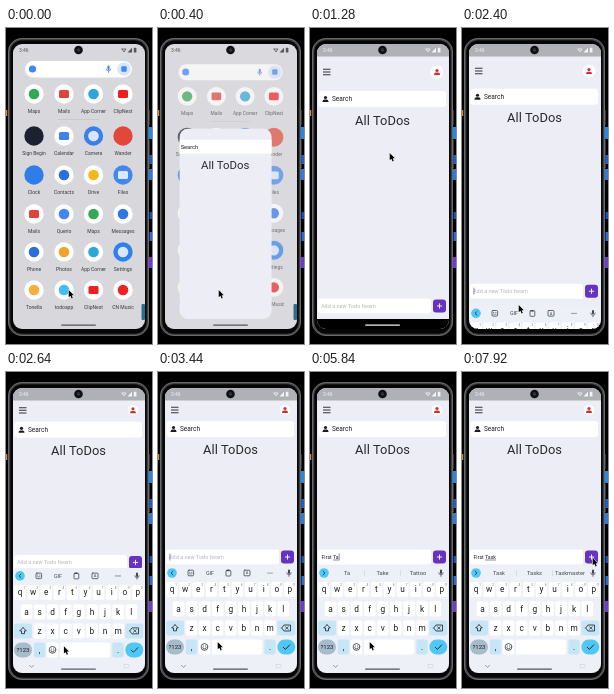
Recreate the animation shown at these times as an HTML page with a canvas. Size 146 by 316 pixels, loop 8000 ms.

```html
<!DOCTYPE html>
<html lang="en">
<head>
<meta charset="utf-8">
<title>Todo app demo</title>
<style>
html, body { margin: 0; width: 100%; height: 100%; overflow: hidden; background: #000; }
canvas { display: block; width: 146px; height: 316px; }
</style>
</head>
<body>
<canvas id="stage"></canvas>
<script>
const W = 146, H = 316, LOOP = 8000;
const canvas = document.getElementById('stage');
const ratio = window.devicePixelRatio || 1;
canvas.width = W * ratio;
canvas.height = H * ratio;
const c = canvas.getContext('2d');

const SCREEN = { x: 7, y: 16, w: 132, h: 285 };
const INK = '#1d1d21', WHITE = '#fff';
const FOCUS = 2080;

const clamp = v => Math.max(0, Math.min(1, v));
const lerp = (a, b, p) => a + (b - a) * p;
const span = (t, start, length) => clamp((t - start) / length);
const smooth = u => u * u * (3 - 2 * u);
const easeOut = u => 1 - (1 - u) * (1 - u);

function box(x, y, w, h, r, fill) {
  c.beginPath();
  c.roundRect(x, y, w, h, r);
  c.fillStyle = fill;
  c.fill();
}
function disc(x, y, r, fill) {
  c.beginPath();
  c.arc(x, y, r, 0, Math.PI * 2);
  c.fillStyle = fill;
  c.fill();
}
function text(str, x, y, size, fill = INK, align = 'center') {
  c.font = size + 'px Roboto, "Noto Sans", sans-serif';
  c.textAlign = align;
  c.textBaseline = 'alphabetic';
  c.fillStyle = fill;
  c.fillText(str, x, y + size * 0.35);
}
function line(points, color, width = 0.8) {
  c.beginPath();
  points.forEach(([x, y], i) => i ? c.lineTo(x, y) : c.moveTo(x, y));
  c.strokeStyle = color;
  c.lineWidth = width;
  c.lineJoin = c.lineCap = 'round';
  c.stroke();
}
function frame(x, y, w, h, r, color, width = 0.8) {
  c.beginPath();
  c.roundRect(x, y, w, h, r);
  c.strokeStyle = color;
  c.lineWidth = width;
  c.stroke();
}
function person(x, y, color) {
  disc(x, y - 1.5, 1.6, color);
  box(x - 3, y + 0.6, 6, 2.4, [2, 2, 0, 0], color);
}
function mic(x, y, color) {
  box(x - 1, y - 3.4, 2, 4.4, 1, color);
  c.beginPath();
  c.arc(x, y - 0.3, 2.2, 0, Math.PI);
  c.strokeStyle = color;
  c.lineWidth = 0.7;
  c.stroke();
  line([[x, y + 2], [x, y + 3.4]], color, 0.7);
}

// label, tile colour, mark colour, mark shape
const APPS = [
  ['Maps', WHITE, '#34a853'], ['Mails', WHITE, '#e04438', 'box'],
  ['App Corner', WHITE, '#2fa6d8'], ['ClipNest', WHITE, '#f01f1f', 'box'],
  ['Sign Begin', '#1b2130'], ['Calendar', WHITE, '#3f82ee', 'box'],
  ['Camera', '#3b80ea', '#d8e6fd'], ['Wander', '#e2483a'],
  ['Clock', '#2f7de6'], ['Contacts', WHITE, '#2c6fdb'],
  ['Drive', WHITE, '#f2b81c'], ['Files', '#4287ee', '#dce9fd', 'box'],
  ['Mails', WHITE, '#e04438', 'box'], ['Querio', WHITE, '#4285f4'],
  ['Maps', WHITE, '#34a853'], ['Messages', WHITE, '#2e78e4'],
  ['Phone', WHITE, '#2d6fd8'], ['Photos', WHITE, '#f0a52a'],
  ['App Corner', WHITE, '#2fa6d8'], ['Settings', '#2f80ea', '#d8e6fd'],
  ['Tonella', WHITE, '#f3b03c'], ['todoapp', WHITE, '#45bdf3'],
  ['ClipNest', WHITE, '#f01f1f', 'box'], ['CN Music', WHITE, '#ec2424']
];
const COLS = [28, 58, 87.5, 117], ROWS = [66, 108, 147, 186, 224, 262];

function statusBar(color) {
  text('3:46', 13, 22, 5, color, 'left');
  line([[116, 21], [120, 21], [118, 24], [116, 21]], color, 0.8);
  c.beginPath();
  c.moveTo(121.5, 24.5);
  c.lineTo(126, 24.5);
  c.lineTo(126, 19.8);
  c.fillStyle = color;
  c.fill();
  box(127.8, 19.8, 2.6, 4.8, 0.6, color);
}
function pill(color) { box(55, 296.4, 35, 1.3, 0.7, color); }

function drawHome(p) {
  box(SCREEN.x, SCREEN.y, SCREEN.w, SCREEN.h, 0, '#d8d8dc');
  c.save();
  const s = 1 - 0.04 * p;
  c.translate(73, 158);
  c.scale(s, s);
  c.translate(-73, -158);
  box(19, 33, 107, 16.5, 8.2, WHITE);
  disc(26.5, 41, 3.6, '#4285f4');
  mic(102.5, 41, '#4078dd');
  disc(118, 41, 6.8, '#d5e7fb');
  box(115.3, 38.3, 5.4, 5.4, 1, '#4285f4');
  box(52, 91.5, 41, 0.6, 0, '#bdbdc2');
  APPS.forEach(([label, tile, mark, shape], i) => {
    const x = COLS[i % 4], y = ROWS[i >> 2];
    disc(x, y, 9.7, tile);
    if (shape) box(x - 5, y - 4, 10, 8, 1.5, mark);
    else if (mark) disc(x, y, 5.3, mark);
    text(label, x, y + 17, 5, '#38383c');
  });
  c.restore();
  c.fillStyle = `rgba(220,220,224,${0.5 * p})`;
  c.fillRect(SCREEN.x, SCREEN.y, SCREEN.w, SCREEN.h);
  box(135.5, 276, 3.5, 16, 1, '#2a6f92');
  statusBar('#55555a');
  pill('#55555a');
}

// typed characters and when each one lands
const MESSAGE = 'First Task';
const KEY_TIMES = [4560, 4720, 4880, 5040, 5200, 5360, 5680, 5840, 6000, 6160];
const HINTS = [
  null, ['F', 'For', 'From'], ['Fi', 'Find', 'Fine'], ['Fir', 'First', 'Fire'],
  ['Firs', 'First', 'Firsts'], ['First', 'Firsts', 'Firstly'],
  ['time', 'of', 'thing'], ['T', 'The', 'To'], ['Ta', 'Take', 'Tattoo'],
  ['Tas', 'Task', 'Taste'], ['Task', 'Tasks', 'Taskmaster']
];
const typedCount = t => KEY_TIMES.filter(k => k <= t).length;

function drawInput(t, y) {
  box(8, y - 7.5, 113, 15, 3, WHITE);
  const count = typedCount(t), typed = MESSAGE.slice(0, count);
  if (count) text(typed, 11.5, y, 5.2, INK, 'left');
  else text('Add a new Todo Iteam', 11, y, 5.5, '#b6b6bd', 'left');
  const width = str => c.measureText(str).width;
  const end = 11.5 + (count ? width(typed) : 0);
  if (count && typed.slice(-1) !== ' ') {
    const from = 11.5 + (count > 6 ? width('First ') : 0);
    box(from, y + 2.8, end - from, 0.5, 0, INK);
  }
  const since = t - (count ? KEY_TIMES[count - 1] : FOCUS);
  if (t >= FOCUS && since % 1000 < 500) box(end + 0.1, y - 3.4, 0.7, 6.8, 0, '#5b54ae');
  box(123, y - 6.5, 13, 13, 3, '#6633c0');
  line([[127.3, y], [131.7, y]], WHITE, 0.9);
  line([[129.5, y - 2.2], [129.5, y + 2.2]], WHITE, 0.9);
}

// rise: 0 at full height, 1 when squeezed above the keyboard
function drawApp(t, rise) {
  const barY = 44 - 6 * rise, searchY = 71 - 14 * rise;
  box(SCREEN.x, SCREEN.y, SCREEN.w, SCREEN.h, 0, '#ededf6');
  box(SCREEN.x, SCREEN.y, SCREEN.w, 12.5, 0, '#b0b0b7');
  statusBar('#f4f4f6');
  for (const d of [-2.7, 0, 2.7]) box(13, barY + d - 0.5, 7.5, 1, 0, '#333338');
  disc(127, barY, 6.6 - 1.4 * rise, WHITE);
  person(127, barY, '#cf3030');
  box(8.5, searchY - 8, 127.5, 16, 3, WHITE);
  person(15.5, searchY, INK);
  text('Search', 22, searchY + 0.2, 6.5, INK, 'left');
  text('All ToDos', 72.5, 92 - 14.7 * rise, 12.9, '#2a2a2e');
  drawInput(t, 278 - 93 * rise);
  box(SCREEN.x, 291, SCREEN.w, 10, 0, '#000');
  pill('#f2f2f2');
}

function key(x, y, w, label, fill = WHITE, r = 2) {
  box(x - w / 2, y - 7.5, w, 15, r, fill);
  if (label) text(label, x, y, 8.3);
}
function drawToolbar(t) {
  const hints = HINTS[typedCount(t)], y = 201, ink = '#3d4850';
  disc(14, y, 4.8, '#4fc8f6');
  const d = hints ? 1 : -1;
  line([[14 - d, y - 1.8], [14 + d, y], [14 - d, y + 1.8]], INK, 0.7);
  mic(131, y, ink);
  if (hints) {
    hints.forEach((word, i) => text(word, [37, 72.5, 108][i], y, 5.7, ink));
    for (const x of [54.5, 90]) box(x, y - 3, 0.5, 6, 0, '#c3ccd3');
    return;
  }
  frame(30, y - 2.8, 5.6, 5.6, 1, ink);
  disc(31.7, y - 0.8, 0.5, ink);
  disc(33.9, y - 0.8, 0.5, ink);
  line([[31.5, y + 0.9], [34.1, y + 0.9]], ink, 0.6);
  text('GIF', 52, y, 5.4, ink);
  frame(68, y - 2.6, 4.8, 5.6, 0.7, ink);
  box(69.2, y - 3.4, 2.4, 1.6, 0.4, ink);
  frame(86, y - 2.8, 6, 5.6, 0.8, ink);
  text('A', 89, y, 4, ink);
  for (const x of [110, 112, 114]) disc(x, y, 0.6, ink);
}
function drawKeyboard(t, shift) {
  c.save();
  c.translate(0, shift);
  box(SCREEN.x, 193, SCREEN.w, 110, 0, '#edf1f7');
  drawToolbar(t);
  const tint = '#c6e6f8', step = 13.1;
  [...'qwertyuiop'].forEach((k, i) => {
    const x = 14 + i * step;
    key(x, 217.5, 11.5, k);
    text(String((i + 1) % 10), x + 4, 213, 3, '#67717a');
  });
  [...'asdfghjkl'].forEach((k, i) => key(20.5 + i * step, 236.8, 11.5, k));
  [...'zxcvbnm'].forEach((k, i) => key(33.5 + i * step, 256, 11.5, k));
  key(17, 256, 18, '', tint);
  line([[17, 252.7], [13.7, 256], [15.5, 256], [15.5, 258.8], [18.5, 258.8],
    [18.5, 256], [20.3, 256], [17, 252.7]], INK, 0.8);
  key(128.3, 256, 18, '', tint);
  line([[123.7, 256], [126, 253], [132.5, 253], [132.5, 259], [126, 259], [123.7, 256]], INK, 0.8);
  line([[127.5, 254.7], [130.3, 257.3]], INK, 0.7);
  line([[130.3, 254.7], [127.5, 257.3]], INK, 0.7);
  key(17, 275, 18, '', '#a5bccb', 7.5);
  text('?123', 17, 275, 6);
  key(33.5, 275, 11.5, ',', tint);
  key(46.5, 275, 11.5, '');
  c.beginPath();
  c.arc(46.5, 275, 3.4, 0, Math.PI * 2);
  c.strokeStyle = INK;
  c.lineWidth = 0.7;
  c.stroke();
  c.beginPath();
  c.arc(46.5, 275.3, 1.7, 0.2, Math.PI - 0.2);
  c.stroke();
  disc(45.3, 274, 0.5, INK);
  disc(47.7, 274, 0.5, INK);
  key(79, 275, 50, '');
  key(112, 275, 11.5, '.', tint);
  key(128.3, 275, 18, '', '#4fc8f6', 7.5);
  line([[125.2, 275.2], [127.4, 277.4], [131.8, 272.8]], INK, 0.9);
  c.restore();
  if (shift < 40) {
    c.globalAlpha = 1 - shift / 40;
    line([[23.5, 293.5], [25.5, 295.3], [27.5, 293.5]], '#697179', 0.7);
    frame(118, 292.5, 5, 3.4, 0.6, '#c2cad0', 0.5);
    pill('#50565c');
    c.globalAlpha = 1;
  }
}

function drawBackdrop() {
  box(0, 0, W, H, 0, '#000');
  box(0, 82, 1.3, 6, 0, '#d88a35');
  box(142.5, 99, 3.5, 12, 0, '#2189e8');
  box(143, 127, 3, 9, 0, '#1d5fd0');
  box(143, 141, 3, 11, 0, '#2a7be6');
  box(143.5, 184, 2.5, 7, 0, '#1a4fb4');
  box(143.5, 204, 2.5, 9, 0, '#2b6adb');
  box(142.5, 229, 3.5, 11, 0, '#7038d8');
  box(142.3, 82, 1.4, 15, 0.5, '#4a4a4d');
  box(142.3, 112, 1.4, 28, 0.5, '#4a4a4d');
  box(2, 10, 141, 298, 14, '#404043');
  frame(2.5, 10.5, 140, 297, 13.5, '#77777b', 0.8);
  box(4.3, 12.3, 136.4, 293.4, 12, '#060607');
}

const PATH = [
  [0, 65, 266], [160, 65, 266], [400, 63, 266], [640, 63, 266],
  [1200, 82, 129], [1440, 82, 129], [2000, 59, 278], [2400, 59, 281],
  [2960, 62, 274], [6880, 62, 274], [7640, 133, 190], [LOOP, 133, 190]
];
function drawPointer(t) {
  const i = PATH.findIndex(p => p[0] > t);
  const [t0, x0, y0] = PATH[i - 1], [t1, x1, y1] = PATH[i];
  const p = smooth(span(t, t0, t1 - t0));
  c.save();
  c.translate(lerp(x0, x1, p) - 2.3, lerp(y0, y1, p) - 4);
  c.beginPath();
  [[0, 0], [0, 7.2], [1.7, 5.7], [2.9, 8.4], [4.1, 7.9], [3, 5.3], [5.2, 5.2]]
    .forEach(([x, y]) => c.lineTo(x, y));
  c.closePath();
  c.lineWidth = 1;
  c.lineJoin = 'round';
  c.strokeStyle = WHITE;
  c.stroke();
  c.fillStyle = '#000';
  c.fill();
  c.restore();
}

function drawLaunch(t, p) {
  const x = lerp(48, SCREEN.x, p), y = lerp(253, SCREEN.y, p);
  const w = lerp(20, SCREEN.w, p), h = lerp(20, SCREEN.h, p);
  const s = 1 - 0.33 * (1 - p);
  c.save();
  c.beginPath();
  c.roundRect(x, y, w, h, lerp(10, 7, p));
  c.clip();
  c.globalAlpha = clamp(p * 5);
  c.translate(x + w / 2, y + h / 2);
  c.scale(s, s);
  c.translate(-73, -158.5);
  drawApp(t, 0);
  c.restore();
}

function draw(t) {
  c.setTransform(ratio, 0, 0, ratio, 0, 0);
  drawBackdrop();
  c.save();
  c.beginPath();
  c.roundRect(SCREEN.x, SCREEN.y, SCREEN.w, SCREEN.h, 9);
  c.clip();
  const open = easeOut(span(t, 160, 600));
  if (open < 1) {
    drawHome(open);
    if (open > 0) drawLaunch(t, open);
  } else {
    const slide = smooth(span(t, 2280, 400));
    drawApp(t, smooth(span(t, 2300, 400)));
    if (slide > 0) drawKeyboard(t, 108 * (1 - slide));
  }
  c.restore();
  disc(72.5, 22, 4.3, '#111113');
  disc(72.5, 22, 1.7, '#34343a');
  drawPointer(t);
}

const begin = performance.now();
function tick() {
  draw((performance.now() - begin) % LOOP);
  requestAnimationFrame(tick);
}
tick();
</script>
</body>
</html>
```
